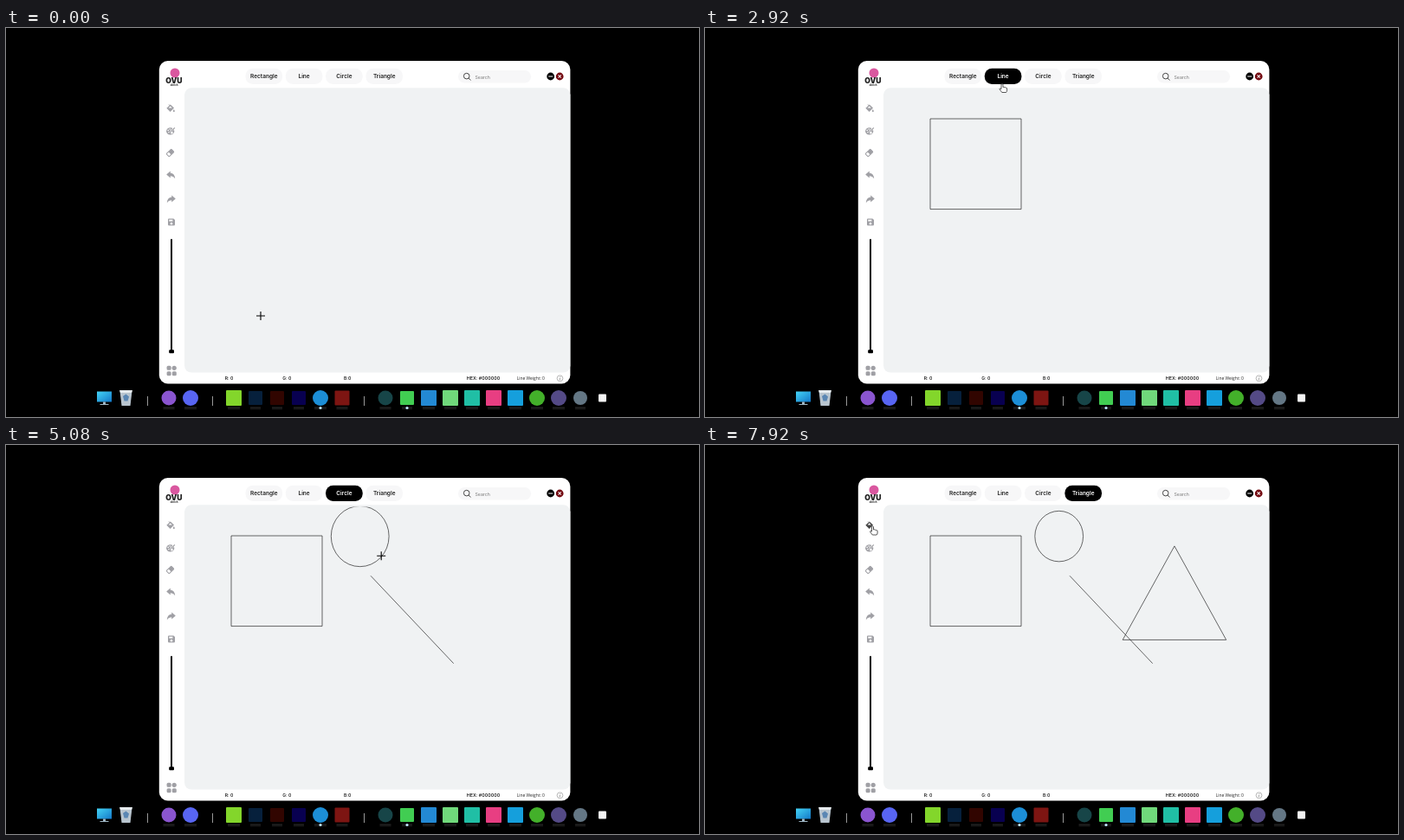
An HTML page that plays this animation: 800x450 px, repeating every 8 s.

```html
<!DOCTYPE html>
<html lang="en">
<head>
<meta charset="utf-8">
<title>Drawing app</title>
<style>
html, body { margin: 0; width: 100%; height: 100%; overflow: hidden; background: #000; }
svg { display: block; width: 100vw; height: 100vh; }
text { font-family: Inter, "Open Sans", sans-serif; fill: #222; }
.tab { font-size: 6.5px; font-weight: 600; text-anchor: middle; }
.status { font-size: 5.1px; font-weight: 600; }
.line { fill: none; stroke: #222; stroke-width: .68; }
.icon { fill: #a0a0a5; }
.cut { fill: #fff; }
.thin { fill: none; stroke: #a0a0a5; stroke-width: 1; }
</style>
</head>
<body>
<svg viewBox="0 0 800 450">
  <defs>
    <clipPath id="sheet"><path d="M206 71.5H651V398H206Z"/></clipPath>
    <linearGradient id="fade" x2="0" y2="1">
      <stop stop-color="#fff" stop-opacity=".16"/>
      <stop offset="1" stop-color="#fff" stop-opacity="0"/>
    </linearGradient>
    <linearGradient id="screen" x2="1" y2="1">
      <stop stop-color="#43d3f5"/><stop offset="1" stop-color="#1479c9"/>
    </linearGradient>
  </defs>
  <rect width="800" height="450"/>
  <rect x="176.8" y="38" width="474.6" height="373.4" rx="10" fill="#fff"/>
  <rect x="206" y="69.3" width="445.4" height="329.3" rx="8" fill="#f0f2f3"/>

  <circle cx="195" cy="52" r="5.5" fill="#d9579f"/>
  <text x="193.8" y="64" font-size="8.6" font-weight="900" text-anchor="middle">OVU</text>
  <text x="194" y="67.2" font-size="2.8" font-weight="700" text-anchor="middle">sketch</text>

  <g id="tabs"></g>

  <rect x="522" y="49" width="84" height="14.5" rx="7.2" fill="#f7f7f8"/>
  <g fill="none" stroke="#333" stroke-width=".9">
    <circle cx="531.7" cy="55.6" r="3.3"/><path d="M534.1 58l2.4 2.4"/>
  </g>
  <text x="541.5" y="58.6" font-size="5.2" style="fill:#777">Search</text>
  <circle cx="628.7" cy="56" r="4.4"/>
  <circle cx="639.2" cy="56" r="4.4" fill="#740a12"/>
  <path d="M626.2 56h5M637.6 54.4l3.2 3.2m0-3.2l-3.2 3.2" stroke="#fff" stroke-width="1.1"/>

  <g id="bucket" class="icon" transform="translate(190 93)">
    <path d="M-4.6-.2L-.2-4.6 4 -.4-.4 4Z"/>
    <path class="cut" d="M-2.4-.6L-.3-2.7 1.8-.6Z"/>
    <path d="M-2-4.5L0-2.5" stroke="#a0a0a5" stroke-width="1"/>
    <path d="M3.8 1Q5.8 3.8 3.8 4.2 2 3.8 3.8 1Z"/>
  </g>
  <g class="icon" transform="translate(190 119)">
    <ellipse cx="-.3" cy=".4" rx="4.6" ry="4.1"/>
    <g class="cut"><circle cx="-2.8" cy="-.6" r=".8"/><circle cx="-.8" cy="-2" r=".8"/>
      <circle cx="-2" cy="1.8" r=".8"/><circle cx="1.4" cy="2.2" r="1.3"/></g>
    <path d="M0 1L4.8-3.8" stroke="#fff" stroke-width="2.4"/>
    <path d="M.4 .8L4.8-3.6" stroke="#a0a0a5" stroke-width="1.3"/>
  </g>
  <g transform="translate(189.5 144.5) rotate(-45)">
    <rect class="thin" x="-4" y="-2.3" width="8" height="4.6" rx=".7"/>
    <rect class="icon" x="-.6" y="-2.3" width="4.6" height="4.6"/>
  </g>
  <path class="icon" d="M185.2 169.4l4.6-4v2.4q5 .2 5.4 6.4-2-3.2-5.4-3v2.4Z"/>
  <path class="icon" d="M195.8 197.4l-4.6-4v2.4q-5 .2-5.4 6.4 2-3.2 5.4-3v2.4Z"/>
  <g transform="translate(191 224.5)">
    <path class="icon" d="M-4-3q0-1 1-1H2.4L4-2.4V3q0 1-1 1H-3q-1 0-1-1Z"/>
    <path class="cut" d="M-2.7-2.8H1.4V-.9H-2.7Z"/><circle class="cut" cy="1.7" r="1.3"/>
  </g>
  <path d="M191 245V374" stroke="#000" stroke-width="2" stroke-linecap="round"/>
  <rect x="188.2" y="372.2" width="5.8" height="4" rx="1"/>
  <g class="icon">
    <rect x="185.6" y="390.8" width="5" height="5" rx="1.5"/><circle cx="194.2" cy="393.3" r="2.6"/>
    <rect x="185.6" y="397.2" width="5" height="5" rx="1.5"/><rect x="191.8" y="397.2" width="5" height="5" rx="1.5"/>
  </g>

  <g class="status">
    <text x="252.8" y="406.6">R: 0</text>
    <text x="319.3" y="406.6">G: 0</text>
    <text x="390" y="406.6">B:0</text>
    <text x="531.8" y="406.6" font-size="5.3">HEX: #000000</text>
  </g>
  <text x="589.8" y="406.8" font-size="4.9" style="font-family:'Open Sans',sans-serif">Line Weight: 0</text>
  <circle cx="639.5" cy="405.3" r="3.4" fill="none" stroke="#888" stroke-width=".6"/>
  <path d="M639.8 403.2v.8m-.2 .8l-.4 2.6" stroke="#777" stroke-width=".7"/>

  <g id="dock">
    <path d="M163.5 426v11M238.5 426v11M413.5 426v11" stroke="#aaa" stroke-width=".9"/>
    <rect x="105" y="420.5" width="17" height="12" fill="url(#screen)"/>
    <path d="M112 432.5h3v2.4h3.5v1h-10v-1h3.5Z" fill="#9fb6c4"/>
    <path d="M131.5 420h14l-2 17h-10Z" fill="#b9c5cf"/>
    <path d="M131 419h15l-1 3h-13Z" fill="#e6ebee"/>
    <path d="M135 426l3.5-2.5 3.5 3-1.5 5h-4Z" fill="#5b87b4"/>
  </g>

  <g class="line" clip-path="url(#sheet)">
    <path id="box"/><path id="stroke"/><ellipse id="ring" cx="408.7" cy="105.6"/><path id="tri"/>
  </g>
  <path id="cross" d="M-5 0H5M0-5V5" fill="none" stroke="#000" stroke-width="1.1"/>
  <path id="hand" d="M-1 .6Q0-.6 1 .6V4Q2 3.3 2.7 4.2 3.8 3.6 4.3 4.7 5.6 4.4 5.6 5.8V8Q5.4 9.2 4.6 10H-.2Q-1.6 8.2-3 6.2-3 4.8-1 6Z"
    fill="#fff" stroke="#222" stroke-width=".75" stroke-linejoin="round"/>
</svg>
<script>
const FPS = 12, LOOP = 8000, TAB = 42.6;
const $ = id => document.getElementById(id);
const add = (parent, tag, attrs) => {
  const el = document.createElementNS("http://www.w3.org/2000/svg", tag);
  for (const k in attrs) el.setAttribute(k, attrs[k]);
  return parent.appendChild(el);
};

const tabs = ["Rectangle", "Line", "Circle", "Triangle"].map((name, i) => {
  const x = 276.5 + i * 46.3;
  const pill = add($("tabs"), "rect", { x, y: 46.8, width: TAB, height: 18.3, rx: 8.5 });
  const label = add($("tabs"), "text", { x: x + TAB / 2, y: 58.4, class: "tab" });
  label.textContent = name;
  return { x, pill, label };
});

// Dock tiles: centre x, colour, size, round
[[188, "#8a55cf", 17, 1], [213, "#5865f2", 18, 1], [263, "#83d62b", 18],
 [288, "#06203c", 16], [313, "#310500", 16], [338, "#080050", 16],
 [363, "#1c8ed6", 18, 1], [388, "#7d1512", 17], [438, "#174548", 17, 1],
 [463, "#41cd52", 16], [488, "#2389d4", 18], [513, "#70d97b", 18],
 [538, "#20bfa5", 18], [563, "#e83e82", 18], [588, "#159fdc", 18],
 [613, "#43b02a", 18, 1], [638, "#544a86", 18, 1], [663, "#647785", 16, 1],
 [688.5, "#f4f4f4", 9]].forEach(([x, fill, size, round]) => {
  add($("dock"), "rect", { x: x - size / 2, y: 428 - size / 2, width: size, height: size, rx: round ? size / 2 : 1, fill });
  if (size > 9) add($("dock"), "rect", { x: x - size / 2 + 2, y: 438.5, width: size - 4, height: 4, fill: "url(#fade)" });
});
for (const x of [363, 463]) add($("dock"), "circle", { cx: x, cy: 439.5, r: 1.6, fill: "#bfe8ff" });

// Pointer path: step, x, y
const path = [
  [0, 294, 333], [10, 298, 60], [11, 298, 60], [14, 270, 114], [15, 270, 114],
  [16, 260, 105], [17, 260, 105], [20, 352.6, 193.5], [22, 365, 209.6], [25, 350, 90],
  [28, 317, 71], [29, 343, 64.5], [35, 343, 64.5], [37, 421, 151.3], [38, 421, 151.3],
  [42, 516.7, 252.7], [43, 516.7, 252.7], [48, 391, 60], [49, 391, 60], [52, 405, 104],
  [53, 408.7, 105.6], [54, 408.7, 105.6], [61, 433.2, 128.3], [63, 428.5, 125.2], [64, 428.5, 125.2],
  [70, 437, 64], [73, 437, 64], [76, 482.2, 116.9], [83, 591, 216], [84, 601.7, 225.4],
  [86, 601.7, 225.4], [93, 207, 95], [95, 193.5, 94]
];

function pointer(step) {
  let i = 1;
  while (i < path.length - 1 && path[i][0] < step) i++;
  const [s0, x0, y0] = path[i - 1], [s1, x1, y1] = path[i];
  const u = Math.min(1, (step - s0) / (s1 - s0));
  const k = s1 - s0 > 4 ? u * u * (3 - 2 * u) : u;
  return [x0 + (x1 - x0) * k, y0 + (y1 - y0) * k];
}

// Drag corners stay put once the button is released.
const drag = (step, from, to) => [...pointer(from), ...pointer(Math.min(step, to))];
const show = (id, on) => $(id).setAttribute("visibility", on ? "visible" : "hidden");

function draw(ms) {
  const step = Math.floor(ms * FPS / 1000 + 0.05);
  const [x, y] = pointer(step);
  const picked = [11, 35, 49, 71].filter(s => step >= s).length - 1;

  tabs.forEach((tab, i) => {
    const over = y < 66 && x > tab.x && x < tab.x + TAB;
    tab.pill.setAttribute("fill", i === picked ? "#000" : over ? "#ebecee" : "#f7f7f8");
    tab.label.style.fill = i === picked ? "#fff" : "#222";
  });

  let [ax, ay, bx, by] = drag(step, 17, 22);
  $("box").setAttribute("d", `M${ax} ${ay}H${bx}V${by}H${ax}Z`);
  show("box", step > 17);

  [ax, ay, bx, by] = drag(step, 38, 42);
  $("stroke").setAttribute("d", `M${ax} ${ay}L${bx} ${by}`);
  show("stroke", step > 38);

  [ax, ay, bx, by] = drag(step, 54, 63);
  const r = Math.hypot(bx - ax, by - ay);
  $("ring").setAttribute("rx", r);
  $("ring").setAttribute("ry", r * 1.05);
  show("ring", step > 54);

  [ax, ay, bx, by] = drag(step, 76, 84);
  $("tri").setAttribute("d", `M${(ax + bx) / 2} ${ay}L${bx} ${by}H${ax}Z`);
  show("tri", step > 76);

  const hand = y < 69 || x < 206;
  show("hand", hand);
  show("cross", !hand);
  $(hand ? "hand" : "cross").setAttribute("transform", `translate(${x} ${y})`);
  $("bucket").style.fill = x < 206 ? "#444" : "";
}

function tick() {
  draw(performance.now() % LOOP);
  requestAnimationFrame(tick);
}
tick();
</script>
</body>
</html>
```
